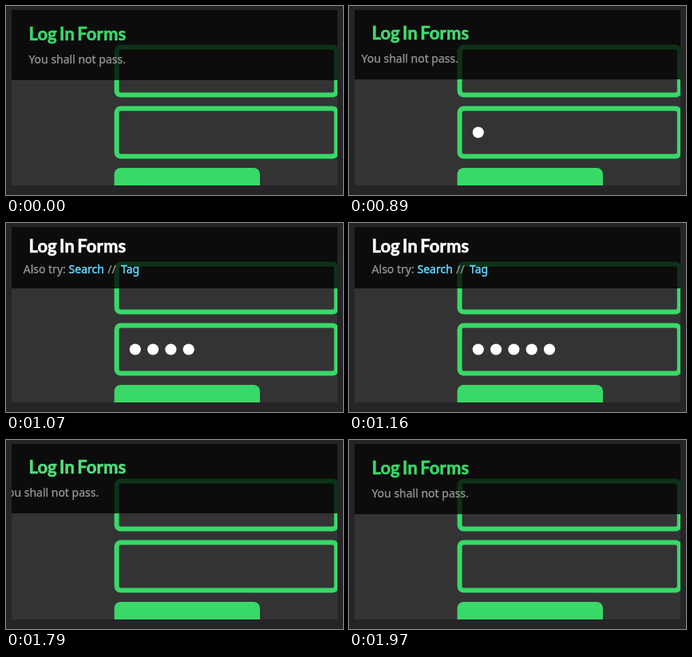
An HTML page with a canvas for the animation above (2730 ms loop, 422 px wide and 237 px high).

```html
<!DOCTYPE html>
<html lang="en">
<head>
<meta charset="utf-8">
<title>Log In Forms</title>
<style>
  html, body { margin: 0; width: 100%; height: 100%; overflow: hidden; background: #252527; }
  canvas { display: block; width: 422px; height: 237px; }
</style>
</head>
<body>
<canvas id="stage"></canvas>
<script>
const W = 422, H = 237, LOOP = 2730;
const STEP = 90, EASE_MS = 250, SLIDE = 250;
const GREEN = [56, 217, 104];
const TITLE_FONT = 'bold 22px Lato, sans-serif';
const TEXT_FONT = '14px "Noto Sans", "Open Sans", sans-serif';

const canvas = document.getElementById('stage');
const ctx = canvas.getContext('2d');
const dpr = window.devicePixelRatio || 1;
canvas.width = W * dpr;
canvas.height = H * dpr;

const rgb = c => `rgb(${c.map(Math.round).join(',')})`;
const mix = (a, b, p) => a + (b - a) * p;

// cubic-bezier(.25, .1, .25, 1)
function ease(x) {
  if (x <= 0) return 0;
  if (x >= 1) return 1;
  const bez = (a, b, u) => 3 * a * u * (1 - u) ** 2 + 3 * b * u * u * (1 - u) + u ** 3;
  let lo = 0, hi = 1;
  for (let i = 0; i < 24; i++) {
    const mid = (lo + hi) / 2;
    if (bez(0.25, 0.25, mid) < x) lo = mid; else hi = mid;
  }
  return bez(0.1, 1, lo);
}

// Hover state, sampled in 90 ms steps: p is 0 at rest and 1 when hovered.
function poseAt(t) {
  const since = (start, lead) => lead + Math.floor((t - start) / STEP) * STEP;
  if (t < 890) return { p: 0, dots: 0 };
  if (t < 1700) {
    const e = since(890, 17);
    return { p: ease(e / EASE_MS), dots: Math.min(5, 1 + Math.floor(e / 65)) };
  }
  return { p: 1 - ease(since(1700, 53) / EASE_MS), dots: 0 };
}

function box(x, y, w, h, r) {
  ctx.beginPath();
  ctx.roundRect(x, y, w, h, r);
}

// A thin stroke thickens the letters.
function write(str, x, y, color, weight) {
  ctx.fillStyle = ctx.strokeStyle = color;
  ctx.lineWidth = weight;
  ctx.fillText(str, x, y);
  ctx.strokeText(str, x, y);
}

function drawForm(dots) {
  ctx.strokeStyle = ctx.fillStyle = rgb(GREEN);
  ctx.lineWidth = 6;
  for (const y of [48.6, 125.5]) {
    box(138.6, y + 3, 275.2, 60, 5);
    ctx.stroke();
  }
  box(135.6, 203, 182.4, 40, 8);
  ctx.fill();

  ctx.fillStyle = '#fff';
  for (let i = 0; i < dots; i++) {
    ctx.beginPath();
    ctx.arc(161.8 + i * 22.3, 158.5, 7.1, 0, Math.PI * 2);
    ctx.fill();
  }
}

function drawHeader(p) {
  const bottom = Math.round(mix(93, 82, p));
  ctx.fillStyle = 'rgba(0,0,0,.77)';
  ctx.fillRect(7, 5, 408, bottom - 5);

  ctx.font = TITLE_FONT;
  ctx.letterSpacing = '0.1px';
  ctx.wordSpacing = '-2.2px';
  write('Log In Forms', 28.5, mix(42.7, 37, p), rgb(GREEN.map(c => mix(c, 255, p))), 0.6);

  ctx.font = TEXT_FONT;
  ctx.letterSpacing = ctx.wordSpacing = '0px';
  const gray = '#999', blue = '#66d9ff';
  write('You shall not pass.', 28.4 - p * SLIDE, bottom - 21, gray, 0.25);

  const dx = (p - 1) * SLIDE, y = 63;
  write('Also try:', 28.6 + dx, y, gray, 0.25);
  write('Search', 85.5 + dx, y, blue, 0.45);
  write('//', 134.2 + dx, y, gray, 0.25);
  write('Tag', 151 + dx, y, blue, 0.45);
}

function draw(t) {
  const { p, dots } = poseAt(t);
  ctx.setTransform(dpr, 0, 0, dpr, 0, 0);
  ctx.fillStyle = '#252527';
  ctx.fillRect(0, 0, W, H);

  ctx.save();
  ctx.beginPath();
  ctx.rect(7, 5, 408, 220);
  ctx.clip();
  ctx.fillStyle = '#333';
  ctx.fillRect(7, 5, 408, 220);
  drawForm(dots);
  drawHeader(p);
  ctx.restore();
}

const start = performance.now();
function tick() {
  draw((performance.now() - start) % LOOP);
  requestAnimationFrame(tick);
}
tick();
</script>
</body>
</html>
```
